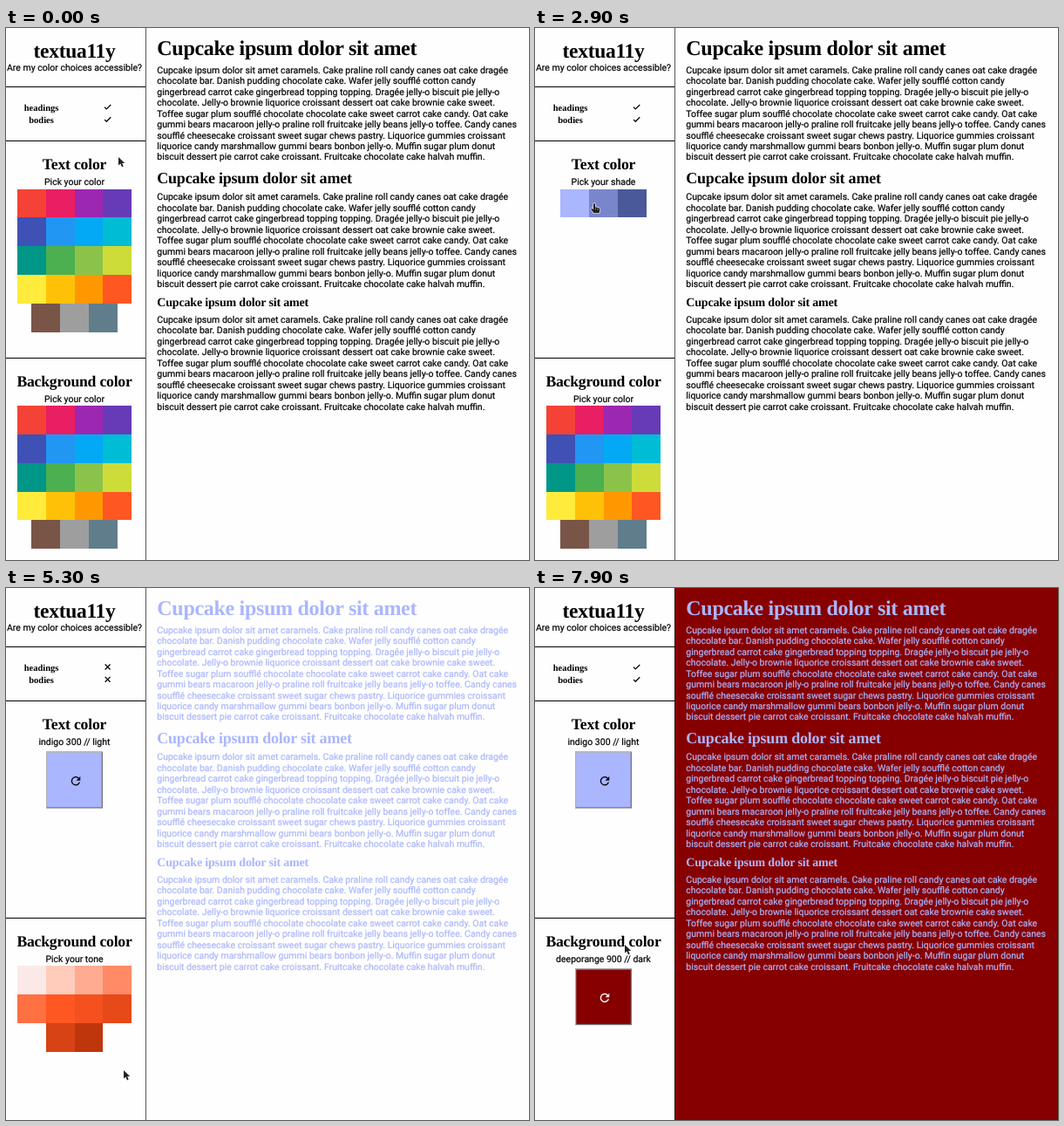
Animation, 600 px wide and 610 px high, one loop 8 s. Source, as an HTML page with a canvas:

```html
<!DOCTYPE html>
<html lang="en">
<head>
<meta charset="utf-8">
<title>Color contrast picker</title>
<style>
  html, body { margin: 0; width: 100%; height: 100%; overflow: hidden; background: #fefefe; }
  canvas { display: block; }
</style>
</head>
<body>
<canvas id="stage" width="600" height="610"></canvas>
<script>
const ctx = document.getElementById('stage').getContext('2d');
const LOOP = 8000, STEP = 100;
const TILE = 32.8, MID = 78.5;
const SANS = '10.5px Roboto, sans-serif';
const serif = size => `bold ${size}px "Liberation Serif", serif`;

const hues = ('#f44336 #e91e63 #9c27b0 #673ab7 #3f51b5 #2196f3 #03a9f4 #00bcd4 #009688 #4caf50 ' +
  '#8bc34a #cddc39 #ffeb3b #ffc107 #ff9800 #ff5722 #795548 #9e9e9e #607d8b').split(' ');
const indigo = '#e8eaf6 #c5cae9 #9fa8da #7986cb #5c6bc0 #3f51b5 #3949ab #303f9f #283593 #1a237e'.split(' ');
const orange = '#fbe9e7 #ffccbc #ffab91 #ff8a65 #ff7043 #ff5722 #f4511e #e64a19 #d84315 #bf360c'.split(' ');

const panels = [
  { title: 'Text color', top: 184.6, clicks: [800, 1900, 3300], tones: indigo,
    shades: ['#aab6fe', '#7986cb', '#49599a'], pick: '#aab6fe', label: 'indigo 300 // light', icon: '#000' },
  { title: 'Background color', top: 433.2, clicks: [5200, 6000, 6700], tones: orange,
    shades: ['#f9683a', '#bf360c', '#870000'], pick: '#870000', label: 'deeporange 900 // dark', icon: '#fff' }
];

const paragraph = [
  'Cupcake ipsum dolor sit amet caramels. Cake praline roll candy canes oat cake dragée',
  'chocolate bar. Danish pudding chocolate cake. Wafer jelly soufflé cotton candy',
  'gingerbread carrot cake gingerbread topping topping. Dragée jelly-o biscuit pie jelly-o',
  'chocolate. Jelly-o brownie liquorice croissant dessert oat cake brownie cake sweet.',
  'Toffee sugar plum soufflé chocolate chocolate cake sweet carrot cake candy. Oat cake',
  'gummi bears macaroon jelly-o praline roll fruitcake jelly beans jelly-o toffee. Candy canes',
  'soufflé cheesecake croissant sweet sugar chews pastry. Liquorice gummies croissant',
  'liquorice candy marshmallow gummi bears bonbon jelly-o. Muffin sugar plum donut',
  'biscuit dessert pie carrot cake croissant. Fruitcake chocolate cake halvah muffin.'
];

// heading size, heading baseline, first paragraph baseline
const sections = [[24, 31, 51.8], [18, 177.6, 197.4], [14, 319.2, 338]];

// cursor stops: time, x, y
const route = [
  [0, 129, 148], [200, 129, 148], [800, 26, 235], [1200, 26, 235],
  [1900, 126, 195], [2000, 128, 193], [2400, 128, 193], [3100, 44, 204],
  [3600, 44, 204], [4100, 102, 421], [4200, 102, 421], [4600, 80, 478],
  [5100, 133, 550], [5300, 135, 553], [5400, 135, 553], [6000, 106, 522],
  [6100, 106, 522], [6500, 117.5, 450.5], [7800, 117.5, 450.5], [7900, 103, 409]
];

function cursorAt(t) {
  const i = route.findIndex(stop => stop[0] > t);
  if (i < 0) return route[route.length - 1].slice(1);
  const [t0, x0, y0] = route[i - 1], [t1, x1, y1] = route[i];
  const k = (t - t0) / (t1 - t0);
  return [x0 + (x1 - x0) * k, y0 + (y1 - y0) * k];
}

function text(str, x, y, font, color = '#000', align = 'left', spacing = 0) {
  ctx.font = font;
  ctx.letterSpacing = spacing + 'px';
  ctx.textAlign = align;
  ctx.fillStyle = color;
  ctx.fillText(str, x, y);
}

const heading = (str, x, y, size, color, align) =>
  text(str, x, y, serif(size), color, align, -size / 80);

// body copy, slightly emboldened
function body(str, x, y, color = '#000', align = 'left') {
  text(str, x, y, SANS, color, align);
  ctx.strokeStyle = color;
  ctx.lineWidth = 0.2;
  ctx.strokeText(str, x, y);
}

function rect(x, y, w, h, color) {
  ctx.fillStyle = color;
  ctx.fillRect(x, y, w, h);
}

// draws inside a 24 unit icon box centred on x, y
function icon(x, y, size, color, draw) {
  ctx.save();
  ctx.translate(x, y);
  ctx.scale(size / 24, size / 24);
  ctx.translate(-12, -12);
  ctx.strokeStyle = ctx.fillStyle = color;
  ctx.lineWidth = 2;
  ctx.beginPath();
  draw();
  ctx.restore();
}

function mark(y, ok) {
  icon(116.6, y, 10.6, '#000', () => {
    ctx.lineWidth = 2.8;
    if (ok) {
      ctx.moveTo(4.1, 12.7); ctx.lineTo(9, 17.6); ctx.lineTo(20.3, 6.3);
    } else {
      ctx.moveTo(5.3, 5.3); ctx.lineTo(18.7, 18.7);
      ctx.moveTo(18.7, 5.3); ctx.lineTo(5.3, 18.7);
    }
    ctx.stroke();
  });
}

function refresh(x, y, color) {
  icon(x, y, 15.7, color, () => {
    ctx.arc(12, 12, 7, 0.29, -0.79);
    ctx.stroke();
    ctx.beginPath();
    ctx.moveTo(20, 4); ctx.lineTo(20, 11); ctx.lineTo(13, 11);
    ctx.fill();
  });
}

// tiles in centred rows of four, snapped to whole pixels
function tilesOf(colors, top) {
  return colors.map((color, i) => {
    const row = Math.floor(i / 4);
    const count = Math.min(4, colors.length - row * 4);
    const left = MID + (i % 4 - count / 2) * TILE;
    const x = Math.round(left), y = Math.round(top + row * TILE);
    const w = Math.round(left + TILE) - x, h = Math.round(top + (row + 1) * TILE) - y;
    return { x, y, w, h, color };
  });
}

const inside = (cx, cy, { x, y, w, h }) => cx >= x && cx < x + w && cy >= y && cy < y + h;

function drawButton({ x, y, w, h }, color) {
  const b = 1.3;
  rect(x, y, w, h, '#767676');
  ctx.fillStyle = '#b4b4b4';
  ctx.beginPath();
  ctx.moveTo(x, y); ctx.lineTo(x + w, y); ctx.lineTo(x + w - b, y + b);
  ctx.lineTo(x + b, y + h - b); ctx.lineTo(x, y + h);
  ctx.fill();
  rect(x + b, y + b, w - 2 * b, h - 2 * b, color);
}

// returns true when the cursor is over something clickable
function drawPanel(panel, t, [cx, cy]) {
  const { top } = panel;
  const stage = panel.clicks.filter(c => t >= c).length;
  heading(panel.title, MID, top - 22.7, 17.7, '#000', 'center');
  const label = stage < 3 ? 'Pick your ' + ['color', 'tone', 'shade'][stage] : panel.label;
  body(label, MID, top - 4.5, '#000', 'center');
  if (stage === 3) {
    const box = { x: 46, y: top + 3, w: 65, h: 65 };
    drawButton(box, panel.pick);
    refresh(80, top + 36.7, panel.icon);
    return inside(cx, cy, box);
  }
  const tiles = tilesOf([hues, panel.tones, panel.shades][stage], top);
  for (const { x, y, w, h, color } of tiles) rect(x, y, w, h, color);
  return tiles.some(tile => inside(cx, cy, tile));
}

const arrowShape = new Path2D('M0 0V9.6L2.3 7.6L4 11.4L5.7 10.6L4.1 7H7.2Z');
const handShape = new Path2D('M-1 1Q0 -.6 1 1V4.4L5 5.2Q6.6 5.6 6.4 7.2L5.6 11.4H-.4L-3.8 7.2Q-3.6 5.6 -2.2 6.2L-1 7.3Z');

function drawCursor([x, y], hand) {
  ctx.save();
  ctx.translate(x, y);
  ctx.lineJoin = 'round';
  ctx.lineWidth = 1.4;
  ctx.strokeStyle = 'rgba(255,255,255,.85)';
  ctx.fillStyle = '#222';
  const shape = hand ? handShape : arrowShape;
  ctx.stroke(shape);
  ctx.fill(shape);
  if (hand) {
    ctx.fillStyle = '#aaa';
    for (const fx of [1.3, 2.9, 4.5]) ctx.fillRect(fx, 5.6, 0.5, 2);
  }
  ctx.restore();
}

function draw(t) {
  const [textPanel, backPanel] = panels;
  const tinted = t >= textPanel.clicks[2], filled = t >= backPanel.clicks[2];
  const ink = tinted ? textPanel.pick : '#000';
  const cursor = cursorAt(t);

  ctx.textRendering = 'geometricPrecision';
  rect(0, 0, 600, 610, '#fefefe');
  if (filled) rect(160, 0, 440, 610, backPanel.pick);
  rect(160, 0, 0.66, 610, '#000');
  for (const y of [67, 129, 378]) rect(0, y, 160, 1, '#000');

  heading('textua11y', MID, 33.5, 23.5, '#000', 'center');
  body('Are my color choices accessible?', MID, 48.8, '#000', 'center');
  text('headings', 40.5, 94.6, serif(10.5), '#000', 'center');
  text('bodies', 40.5, 109, serif(10.5), '#000', 'center');
  mark(90.5, !tinted || filled);
  mark(104.8, !tinted || filled);

  for (const [size, headY, bodyY] of sections) {
    heading('Cupcake ipsum dolor sit amet', 173.3, headY, size, ink);
    paragraph.forEach((line, i) => body(line, 173.3, bodyY + i * 12.45, ink));
  }

  const hand = panels.map(p => drawPanel(p, t, cursor)).some(Boolean);
  drawCursor(cursor, hand);
}

function tick() {
  const t = performance.now() % LOOP;
  draw(Math.floor(t / STEP) * STEP);
  requestAnimationFrame(tick);
}
tick();
</script>
</body>
</html>
```
